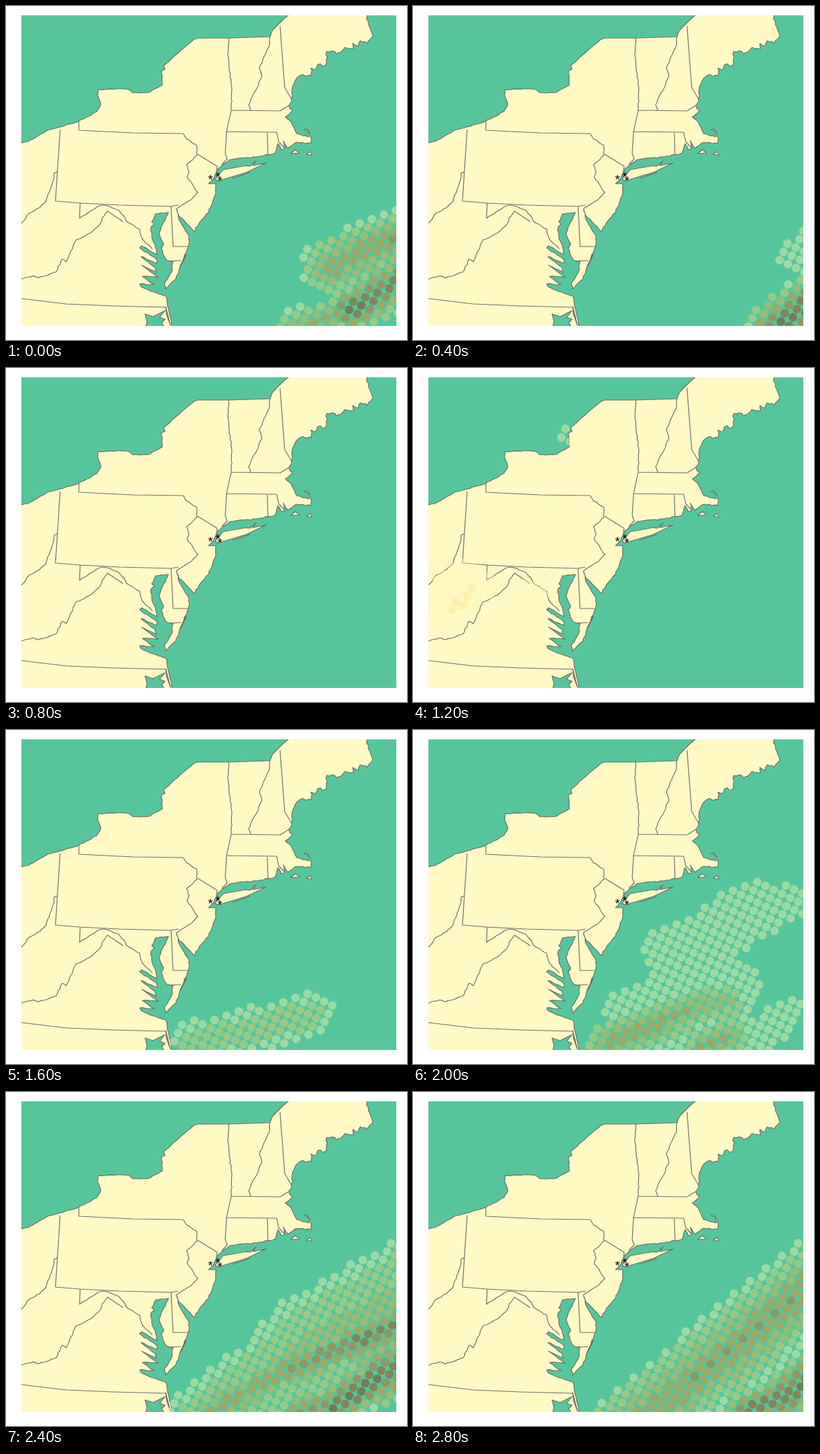
These frames come from a looping animation (600x500 px, 3.2 s). An HTML page with a canvas:

```html
<!DOCTYPE html>
<html lang="en">
<head>
<meta charset="utf-8">
<title>Coastal rain map</title>
<style>
  html, body { margin: 0; width: 100%; height: 100%; overflow: hidden; background: #fff; }
  canvas { display: block; }
</style>
</head>
<body>
<canvas id="map" width="600" height="500"></canvas>
<script>
const ctx = document.getElementById('map').getContext('2d');
const STEP = 400;
const BOX = [23, 14, 561, 465];
const SEA = '#57c59b', LAND = '#fff9c4';

let seed = 7;
function random() {
  seed = seed * 16807 % 2147483647;
  return seed / 2147483647;
}

// Turns a few points into a natural line with small bends of the given size.
function rough(points, size) {
  const p = points.split(' ').map(Number);
  const out = [p[0], p[1]];
  for (let i = 2; i < p.length; i += 2) {
    const dx = p[i] - p[i - 2], dy = p[i + 1] - p[i - 1];
    const length = Math.hypot(dx, dy), parts = Math.ceil(length / 5);
    for (let k = 1; k < parts; k++) {
      const bend = (random() - .5) * 2 * size / length;
      out.push(p[i - 2] + dx * k / parts - dy * bend, p[i - 1] + dy * k / parts + dx * bend);
    }
    out.push(p[i], p[i + 1]);
  }
  return out.join(' ');
}

// Coast, clockwise; ends outside the box are clipped away.
const lakes = rough('15 205 33 203 47 195 62 186 81 181 108 173 136 158 142 147 137 134 138 125 165 124 184 125 190 130 215 129 234 118 233 97 238 95 236 89 258 70 281 50', .7);
const north = '287 48 334 48 395 46 398 38 400 35 415 20 427 10';
const maine = rough('538 10 549 45 540 56 530 52 527 60 519 56 520 64 507 62 501 69 495 72 488 67 480 68 478 89 466 88 462 96 456 93 457 104 440 104 431 116 427 139 423 149', 1.8);
const bays = rough('425 154 429 156 418 166 427 174 435 191 453 196 453 188 446 185 451 184 457 198 456 206 435 204 422 213 415 202 417 213 412 215 407 206 403 220 375 226 335 230 317 244 311 258 303 266', .8);
const shore = rough('314 266 314 280 303 309 284 332 283 338 276 331 259 315 255 303 259 320 274 345 273 360 262 386 254 409 239 424 237 417 249 394 250 382 240 380 232 362 236 356 229 340 236 323 243 309', 1);
const inlets = rough('236 310 224 311 218 323 222 327 217 331 218 345 224 362 226 372 203 359 200 362 226 380 226 385 202 375 223 391 225 399 203 388 228 406 204 405 222 417 200 416 202 420 228 431 239 434 241 442 251 490', .8);
const land = 'M' + [lakes, north, maine, bays, shore, inlets].join(' ') + ' 15 490Z';

const islands = 'M313 259 325 245 359 239 365 240 374 232 369 239 389 235 360 249 317 262ZM426 221 433 215 439 220ZM449 222 455 218 458 223ZM339 258 365 249 351 254Z';
const sounds = 'M207 490 211 472 208 461 220 465 238 456 230 466 238 469 233 474 243 490ZM239 450 246 478 240 461Z';

const surveyed = 'M81 185 74 292 111 295 170 298 247 300 258 298M109 173 109 186 190 190 265 191M287 222 316 240 314 252M410 30 417 122 427 139M337 156 410 157 423 149M330 188 405 189 408 203 416 212M391 190 392 222M111 295 110 318M247 300 250 360 273 360M246 382 262 381M269 371 261 390M270 372 262 388M23 438 90 446 160 449 240 451M337 156 330 188 328 221 331 229 323 237';
const rivers = [
  '77 248 72 250 72 257 60 292 50 302 35 310 23 325',
  '265 191 270 199 285 208 286 223 270 238 274 248 271 256 287 279 277 290 256 303',
  '333 48 332 74 338 125 337 156',
  '395 46 394 60 379 93 383 106 363 148 366 156',
  '110 318 140 299 151 299 169 306 177 315 180 322 200 334 204 349 219 364',
  '175 323 152 307 144 317 141 326 126 340 105 350 95 372 90 383 84 379 75 398 48 407 40 404 23 409'
].map(points => 'M' + rough(points, .8)).join('');

const shapes = { land, islands, sounds, borders: surveyed + rivers };
for (const name in shapes) shapes[name] = new Path2D(shapes[name]);

const PALE = 'rgba(255,249,175,.42)';
const WARM = 'rgba(250,205,100,.27)';
const LEVELS = [PALE, '#96cb87', '#95bd76', '#99aa66', '#8e9862', '#7f8759', '#6c7e58'];

// Rain bands: x1, y1, x2, y2, reach, peak level (pale if left out).
const passing = [
  [485, 390, 590, 345, 44, 3.6], [430, 480, 515, 455, 26, 2.8],
  [515, 455, 545, 438, 36, 6.4], [545, 438, 600, 400, 42, 5]
];
const leaving = [[572, 375, 610, 350, 27], [545, 480, 600, 440, 45, 6]];
const inland = [[23, 330, 85, 325, 36], [180, 328, 195, 335, 16]];
const forming = [[280, 470, 460, 425, 34, 1.2]];
const growing = [
  [385, 335, 450, 308, 44], [450, 308, 510, 268, 45], [510, 268, 565, 256, 27],
  [315, 420, 490, 382, 35], [370, 470, 480, 435, 32], [505, 470, 560, 425, 25],
  [290, 470, 409, 420, 34, 3.2], [409, 420, 470, 405, 30, 2.6], [430, 475, 475, 460, 30, 2.8]
];
const spreading = [
  [300, 500, 450, 385, 64, 2], [450, 385, 620, 290, 79, 2],
  [310, 476, 420, 415, 30, 3.4], [420, 415, 520, 375, 34, 4.4], [520, 375, 600, 345, 40, 5.2],
  [440, 478, 490, 472, 38, 4], [490, 472, 560, 425, 36, 6.4], [560, 425, 610, 400, 46, 5.8]
];
const heaviest = [
  [300, 525, 450, 405, 60, 3.6], [450, 405, 620, 270, 63, 3.6],
  [495, 478, 555, 457, 34, 5.6], [555, 457, 610, 417, 42, 5.8]
];
const spots = [
  [228, 91, PALE], [222, 104, PALE], [235, 110, PALE],
  [88, 330, WARM], [82, 342, WARM], [76, 355, WARM], [64, 350, WARM], [58, 362, WARM]
];

function segmentDistance(x, y, x1, y1, x2, y2) {
  const dx = x2 - x1, dy = y2 - y1;
  const t = Math.max(0, Math.min(1, ((x - x1) * dx + (y - y1) * dy) / (dx * dx + dy * dy)));
  return Math.hypot(x - x1 - t * dx, y - y1 - t * dy);
}

// Rain readings sit on a tilted square grid.
function buildDots(bands) {
  const dots = bands === inland ? [...spots] : [];
  for (let m = -32; m < 34; m++) for (let n = -40; n < 16; n++) {
    const x = 264 + 12.3 * m - 5.85 * n;
    const y = 472 + 5.9 * m + 12.4 * n;
    const level = Math.max(...bands.map(([x1, y1, x2, y2, reach, peak = .4]) => {
      const closeness = 1 - segmentDistance(x, y, x1, y1, x2, y2) / reach;
      return closeness < 0 ? -1 : peak * closeness;
    }));
    if (level >= 0) dots.push([x, y, LEVELS[Math.round(level)]]);
  }
  return dots;
}
const scenes = [passing, leaving, [], inland, forming, growing, spreading, heaviest].map(buildDots);

function drawMap() {
  ctx.fillStyle = SEA;
  ctx.fillRect(...BOX);
  ctx.strokeStyle = '#6b6b6b';
  ctx.lineWidth = 1.15;
  ctx.lineJoin = 'round';
  for (const [name, fill] of [['land', LAND], ['islands', LAND], ['sounds', SEA]]) {
    ctx.fillStyle = fill;
    ctx.fill(shapes[name]);
    ctx.stroke(shapes[name]);
  }
  ctx.stroke(shapes.borders);
}

function draw(time) {
  ctx.clearRect(0, 0, 600, 500);
  ctx.save();
  ctx.beginPath();
  ctx.rect(...BOX);
  ctx.clip();
  drawMap();
  for (const [x, y, color] of scenes[Math.floor(time / STEP) % scenes.length]) {
    ctx.fillStyle = color;
    ctx.beginPath();
    ctx.arc(x, y, 6.4, 0, 2 * Math.PI);
    ctx.fill();
  }
  ctx.fillStyle = '#000';
  ctx.font = '19px "Liberation Sans", Arial, sans-serif';
  ctx.textAlign = 'center';
  for (const [x, y] of [[306, 255], [317, 251], [320, 257]]) ctx.fillText('*', x, y + 11);
  ctx.restore();
}

const start = performance.now();
function tick() {
  draw(performance.now() - start);
  requestAnimationFrame(tick);
}
tick();
</script>
</body>
</html>
```
